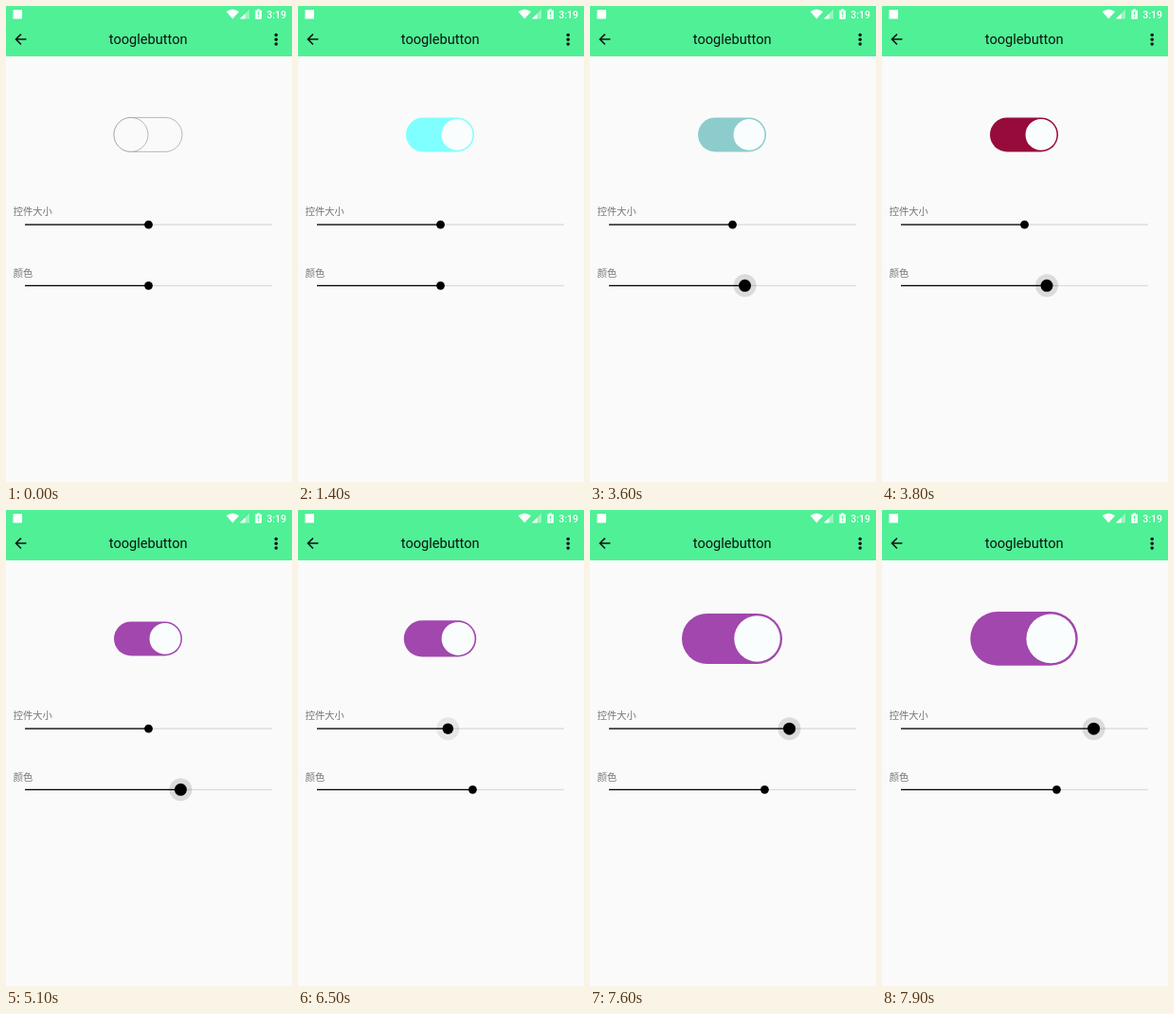
Recreate the animation shown at these times as an HTML page. Size 302 px wide and 501 px high, loop 8000 ms.

```html
<!DOCTYPE html>
<html lang="zh">
<head>
<meta charset="utf-8">
<style>
  html, body { margin: 0; height: 100%; overflow: hidden; background: #fafafa; }
  svg { display: block; width: 100%; height: 100%; }
  text { font-family: Roboto, "Noto Sans CJK SC", "Noto Sans CJK", sans-serif; }
  .label { font-size: 10.3px; fill: #757575; }
</style>
</head>
<body>
<svg viewBox="0 0 302 501">
  <rect width="302" height="53" fill="#50f096"/>

  <g fill="#fff">
    <rect x="7.5" y="4" width="9.5" height="9.5"/>
    <path d="M232.6 6Q239.3 .8 246 6L239.3 13.6Z"/>
    <path d="M257 3.5V13.5H247Z" opacity=".4"/>
    <path d="M252.5 8V13.5H247Z"/>
    <path d="M265.3 3.2h2.6v1.2h2v9.4h-6.6v-9.4h2z"/>
    <path d="M266.6 6v3.6M266.6 10.7v1.3" stroke="#50f096" stroke-width="1.3"/>
    <text x="275.3" y="12.7" font-size="10.5" font-weight="500">3:19</text>
  </g>

  <g fill="#111">
    <path transform="translate(6.4 26.1) scale(.75)" d="M20 11H7.83l5.59-5.59L12 4l-8 8 8 8 1.41-1.41L7.83 13H20z"/>
    <circle cx="285.2" cy="30.4" r="1.75"/>
    <circle cx="285.2" cy="35.2" r="1.75"/>
    <circle cx="285.2" cy="40" r="1.75"/>
    <text x="150.2" y="40" font-size="14.6" text-anchor="middle">tooglebutton</text>
  </g>

  <rect id="body" stroke-width=".6"/>
  <circle id="knob" cy="135.4" stroke-width=".6"/>

  <text class="label" x="7.7" y="220.3">控件大小</text>
  <text class="label" x="7.7" y="284.6">颜色</text>
  <g id="size" transform="translate(20 230.2)"></g>
  <g id="color" transform="translate(20 294.3)"></g>
</svg>
<script>
const LOOP = 8000, STEP = 100, TRACK = 261, CENTER_X = 150, CENTER_Y = 135.4;
const $ = id => document.getElementById(id);
const set = (el, attrs) => { for (const k in attrs) el.setAttribute(k, attrs[k]); };

// Rises evenly from 0 to 1 between two times.
const ramp = (t, from, to) => Math.min(1, Math.max(0, (t - from) / (to - from)));

for (const id of ["size", "color"]) {
  $(id).innerHTML = `<path d="M0 0H${TRACK}" stroke="#dadada" stroke-width="1.2"/>
    <path class="done" stroke="#000" stroke-width="1.2"/>
    <circle class="halo" r="12"/><circle class="thumb"/>`;
}

function drawSlider(id, percent, press) {
  const part = name => $(id).querySelector("." + name);
  const x = TRACK * percent / 100;
  set(part("done"), { d: `M0 0H${x}` });
  set(part("halo"), { cx: x, "fill-opacity": .12 * press });
  set(part("thumb"), { cx: x, r: 4.4 + 2.1 * press });
}

// The colour slider's share of 0xffffff is the track colour.
function drawToggle(on, size, color) {
  const h = 36 + (size - 50) * .74;
  const stroke = on ? "none" : "#8c8c8c";
  const rgb = Math.floor(0xffffff * color / 100);
  const channel = shift => Math.round(250 + ((rgb >> shift & 255) - 250) * on);
  set($("body"), {
    x: CENTER_X - h, y: CENTER_Y - h / 2, width: 2 * h, height: h, rx: h / 2,
    fill: `rgb(${channel(16)},${channel(8)},${channel(0)})`, stroke
  });
  set($("knob"), {
    cx: CENTER_X + h * (on - .5), r: h / 2 * (on ? .915 : 1),
    fill: on ? "#f9fdfd" : "#fafafa", stroke
  });
}

function frame(now) {
  const t = Math.floor(now % LOOP / STEP) * STEP;
  const color = Math.round(50 + 9 * ramp(t, 3300, 3800) + 3 * ramp(t, 4300, 4500) + ramp(t, 5000, 5100));
  const size = Math.round(50 + 13 * ramp(t, 6400, 6900) + 6 * ramp(t, 7000, 7200)
    + 2 * ramp(t, 7300, 7400) + 7 * ramp(t, 7500, 7900));
  drawToggle(ramp(t, 1200, 1400), size, color);
  drawSlider("size", size, ramp(t, 6300, 6600));
  drawSlider("color", color, ramp(t, 3300, 3500) - ramp(t, 5600, 5800));
  requestAnimationFrame(frame);
}
frame(performance.now());
</script>
</body>
</html>
```
